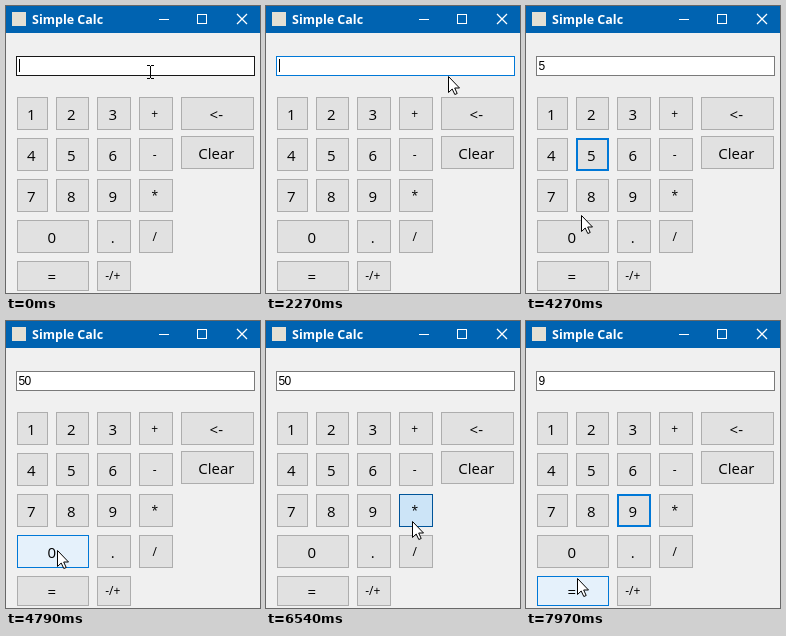
An HTML page that plays this animation: 254 by 287 pixels, repeating every 8 s.

```html
<!DOCTYPE html>
<html lang="en">
<head>
<meta charset="utf-8">
<title>Simple Calc</title>
<style>
  html, body { margin: 0; width: 100%; height: 100%; overflow: hidden; background: #f0f0f0; }
  svg { display: block; width: 254px; height: 287px; }
  rect, .crisp { shape-rendering: crispEdges; }
  text { font-family: "Open Sans", "Noto Sans", sans-serif; font-size: 15px; fill: #000; white-space: pre; }
  .title { font-size: 12.5px; font-weight: 700; fill: #fff; }
  .key text { text-anchor: middle; }
  .small text { font-size: 12px; }
  .entry { font-family: "Liberation Sans", Arial, sans-serif; font-size: 12px; letter-spacing: -.6px; }
  .key rect { fill: #e1e1e1; stroke: #adadad; }
  .key.focus rect { stroke: #0078d7; stroke-width: 2; }
  .key.hover rect { fill: #e5f1fb; stroke: #0078d7; stroke-width: 1; }
  .key.down rect { fill: #cce4f7; stroke: #005499; stroke-width: 1; }
</style>
</head>
<body>
<svg viewBox="0 0 254 287" xmlns="http://www.w3.org/2000/svg">
  <rect width="254" height="287" fill="#f0f0f0"/>
  <rect width="254" height="27" fill="#0063b1"/>
  <rect x="6" y="6" width="14" height="14" fill="#e4e0d4"/>
  <text class="title" x="26" y="18">Simple Calc</text>
  <g fill="none" stroke="#fff">
    <path class="crisp" d="M153 13.5h10M191.5 8.5h9v9h-9z"/>
    <path d="M231 8l10 10M241 8l-10 10" stroke-width="1.3"/>
  </g>
  <rect id="field" x="10.5" y="50.5" width="238" height="19" fill="#fff"/>
  <text id="entry" class="entry" x="12.5" y="64"></text>
  <rect id="caret" x="13" y="53" width="1" height="13"/>
  <g id="keys"></g>
  <path id="beam" class="crisp" fill="none" stroke="#000"
        d="M-3 -5.5h3M1 -5.5h3M.5 -5v12M-3 7.5h3M1 7.5h3"/>
  <path id="arrow" fill="#fff" stroke="#000" stroke-linejoin="round"
        d="M.5 .5V16.5L4.2 13L6.8 18.5L9.2 17.5L6.7 12H11.5Z"/>
</svg>
<script>
const LOOP = 8000, HOLD = 120, BLINK = 530;

// ">" widens the key on its left
const ROWS = ["1 2 3 + <-", "4 5 6 - Clear", "7 8 9 *", "0 > . /", "= > -/+"];
const COLUMNS = [
  { left: 11, right: 42, pitch: 41 },
  { left: 50, right: 83, pitch: 41 },
  { left: 91, right: 125, pitch: 41 },
  { left: 133, right: 167, pitch: 41 },
  { left: 175, right: 248, pitch: 39 }
];

const HOME = { x: 144, y: 65 };
const MOVES = [
  { from: 130, to: 510, x: 182, y: 70 },
  { from: 3400, to: 3700, x: 67, y: 153 },
  { from: 4130, to: 4400, x: 51, y: 229 },
  { from: 4930, to: 5400, x: 144, y: 108 },
  { from: 5810, to: 6230, x: 146, y: 200 },
  { from: 6800, to: 7190, x: 97, y: 187 },
  { from: 7700, to: 7970, x: 51, y: 257 }
];
const CLICKS = [
  { at: 3850, label: "5" }, { at: 4670, label: "0" },
  { at: 6540, label: "*" }, { at: 7450, label: "9" }
];

const $ = id => document.getElementById(id);
const setAll = (el, attrs) => {
  for (const name in attrs) el.setAttribute(name, attrs[name]);
  return el;
};
const make = (tag, parent) =>
  parent.appendChild(document.createElementNS("http://www.w3.org/2000/svg", tag));
const show = (el, on) => el.setAttribute("visibility", on ? "visible" : "hidden");
const inside = (p, { x, y, w, h }) => p.x >= x && p.x < x + w && p.y >= y && p.y < y + h;
const ease = u => u * u * (3 - 2 * u);

function makeKey(label, x, y, w) {
  const h = Math.min(33, 285 - y);
  const small = /^[-+*\/]/.test(label);
  const el = make("g", $("keys"));
  const box = make("rect", el);
  const text = setAll(make("text", el), { x: x + w / 2 - 1.2, y: y + Math.ceil(h / 2) + (small ? 4.3 : 5.5) });
  text.textContent = label;
  return { label, x, y, w, h, small, el, box };
}

const keys = ROWS.flatMap((row, r) => {
  const labels = row.split(" ");
  return labels.flatMap((label, c) => {
    if (label === ">") return [];
    const { left, pitch } = COLUMNS[c];
    const { right } = COLUMNS[labels[c + 1] === ">" ? c + 1 : c];
    return makeKey(label, left, 91 + r * pitch, right - left);
  });
});

// The pointer jumps in even time steps along an eased path.
function pointerAt(t) {
  let { x, y } = HOME;
  for (const move of MOVES) {
    if (t < move.from) break;
    const span = move.to - move.from;
    const gaps = Math.round(span / 135);
    const step = Math.min(gaps, Math.floor((t - move.from) / span * gaps + 1e-6)) + 1;
    const u = ease(step / (gaps + 1));
    x += (move.x - x) * u;
    y += (move.y - y) * u;
  }
  return { x: Math.round(x), y: Math.round(y) };
}

// Digits extend the entry, operators clear it.
function calcAt(t) {
  let focus = "", down = "", entry = "";
  for (const { at, label } of CLICKS) {
    if (t < at) break;
    focus = label;
    if (t < at + HOLD) down = label;
    else entry = /\d/.test(label) ? entry + label : "";
  }
  return { focus, down, entry };
}

function drawKey(key, pointer, focus, down) {
  const states = {
    small: key.small,
    focus: key.label === focus,
    hover: inside(pointer, key),
    down: key.label === down
  };
  const inset = states.focus && !states.hover ? 1 : 0.5;
  setAll(key.box, {
    x: key.x + inset, y: key.y + inset,
    width: key.w - 2 * inset, height: key.h - 2 * inset
  });
  key.el.setAttribute("class", ["key", ...Object.keys(states).filter(s => states[s])].join(" "));
}

function draw(t) {
  const pointer = pointerAt(t);
  const { focus, down, entry } = calcAt(t);
  for (const key of keys) drawKey(key, pointer, focus, down);

  const overField = inside(pointer, { x: 10, y: 50, w: 239, h: 20 });
  const blinks = Math.max(0, Math.floor((t - 150) / BLINK));
  $("field").setAttribute("stroke", overField ? "#171717" : focus ? "#7a7a7a" : "#0078d7");
  $("entry").textContent = entry;
  show($("caret"), !focus && blinks % 2 === 0);
  show($("beam"), overField);
  show($("arrow"), !overField);
  for (const id of ["beam", "arrow"]) $(id).setAttribute("transform", `translate(${pointer.x} ${pointer.y})`);
}

const start = performance.now();
function tick() {
  draw((performance.now() - start) % LOOP);
  requestAnimationFrame(tick);
}
tick();
</script>
</body>
</html>
```
